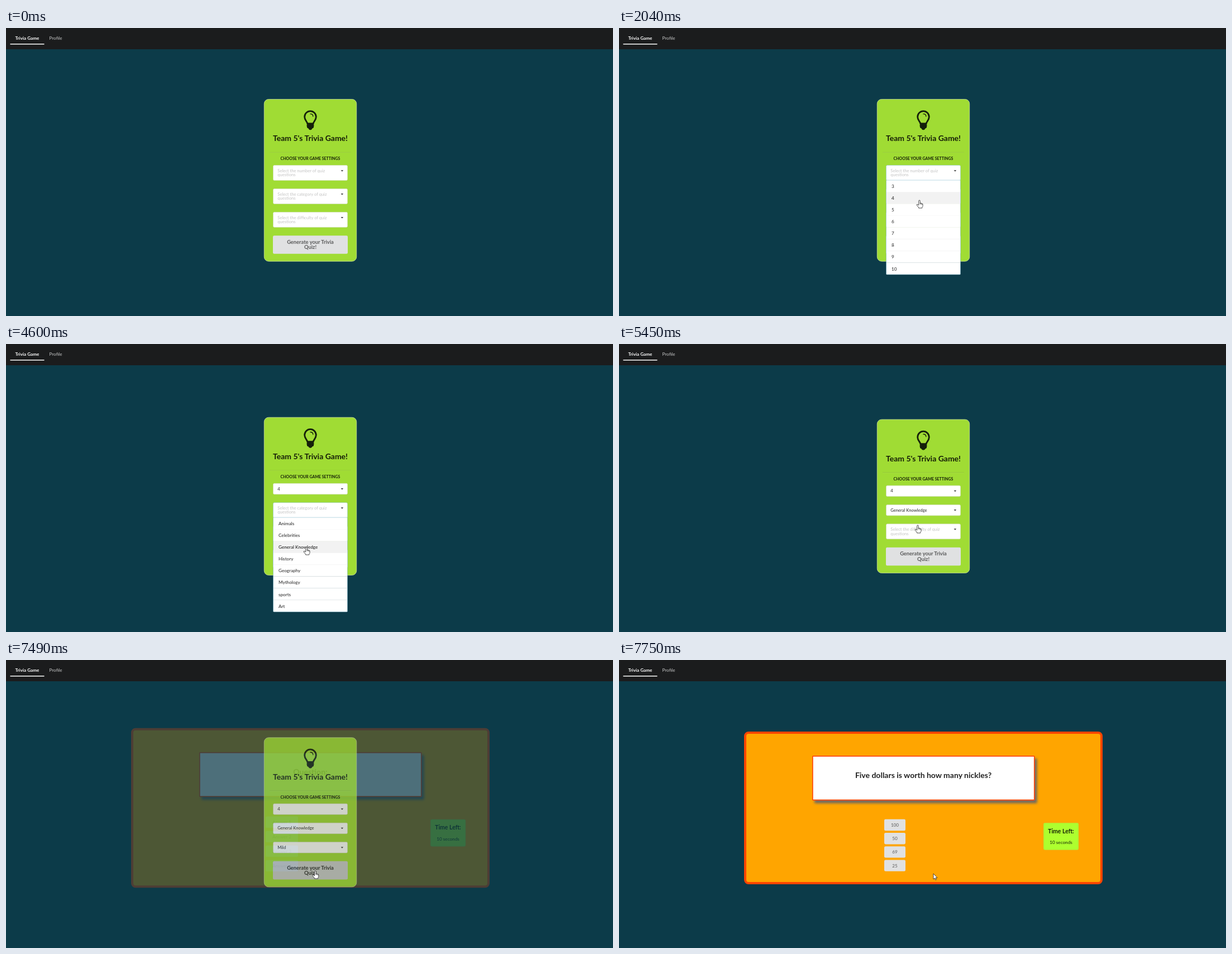
Write an HTML page that moves like this. It is 1087 px wide and 515 px high and loops after 8000 ms.

```html
<!DOCTYPE html>
<html lang="en">
<head>
<meta charset="utf-8">
<title>Trivia game</title>
<style>
  html, body { margin: 0; width: 100%; height: 100%; overflow: hidden; background: #0c3b49; }
  svg { display: block; width: 1087px; height: 515px; font-family: Lato, "Open Sans", sans-serif; }
</style>
</head>
<body>
<svg id="stage" viewBox="0 0 1087 515">
  <defs>
    <filter id="drop" x="-10%" y="-20%" width="120%" height="150%">
      <feDropShadow dx="4" dy="5" stdDeviation="2" flood-color="#666" flood-opacity=".95"/>
    </filter>
    <filter id="soft" x="-10%" y="-10%" width="120%" height="120%">
      <feDropShadow dx="0" dy="1" stdDeviation="1" flood-color="#222426" flood-opacity=".15"/>
    </filter>
  </defs>
  <rect width="1087" height="515" fill="#0c3b49"/>
  <g id="scene"></g>
  <rect width="1087" height="38" fill="#1b1c1d"/>
  <text x="16.5" y="20.8" font-size="8.17" font-weight="700" fill="#fff">Trivia Game</text>
  <text x="77.5" y="20.8" font-size="8.17" fill="#c8c9c9">Profile</text>
  <rect x="7.5" y="28" width="61" height="1.5" fill="#fff"/>
  <g id="pointer"></g>
</svg>
<script>
const LOOP = 8000, REM = 8.17, MID = 545, LEFT = 478.5, WIDTH = 133, ROW = 21.1;
const INK = 'rgba(0,0,0,.87)', GREEN = '#a0dc34';
const scene = document.getElementById('scene');
const pointer = document.getElementById('pointer');

const fields = [
  { name: 'number', open: 990, close: 2100, pick: 1,
    items: ['3', '4', '5', '6', '7', '8', '9', '10'] },
  { name: 'category', open: 3040, close: 4940, pick: 2,
    items: ['Animals', 'Celebrities', 'General Knowledge', 'History',
            'Geography', 'Mythology', 'sports', 'Art'] },
  { name: 'difficulty', open: 5790, close: 6525, pick: 0,
    items: ['Mild', 'Medium', 'SPICY!'] }
];

// Pointer tip: time, x, y
const path = [
  [130, 1029, 492], [920, 543, 262], [1190, 543, 262], [1650, 538, 308],
  [2300, 538, 308], [2700, 537, 298], [3500, 537, 298], [3820, 537, 318],
  [3880, 537, 318], [4600, 538, 363], [4980, 538, 363], [5450, 535, 324],
  [5980, 535, 324], [6400, 533, 355], [6630, 533, 355], [7020, 552, 376],
  [7420, 552, 376], [7700, 563, 382]
];

const clamp = v => Math.min(1, Math.max(0, v));
const progress = (t, from, to) => clamp((t - from) / (to - from));
const easeOut = (u, n) => 1 - (1 - u) ** n;
const smooth = u => u * u * (3 - 2 * u);

function tipAt(t) {
  let i = 0;
  while (i < path.length - 2 && t >= path[i + 1][0]) i++;
  const [a, b] = [path[i], path[i + 1]];
  const u = progress(t, a[0], b[0]);
  const e = i ? smooth(u) : easeOut(u, 2.3);
  return { x: a[1] + (b[1] - a[1]) * e, y: a[2] + (b[2] - a[2]) * e };
}

const rect = (x, y, w, h, fill, more = '') =>
  `<rect x="${x}" y="${y}" width="${w}" height="${h}" fill="${fill}" ${more}/>`;
const text = (s, x, y, size, fill = INK, more = '') =>
  `<text x="${x}" y="${y}" font-size="${size}" fill="${fill}" ${more}>${s}</text>`;
const centred = (s, x, y, size, fill, weight = 700) =>
  text(s, x, y, size, fill, `text-anchor="middle" font-weight="${weight}"`);
const group = (content, attrs) => `<g ${attrs}>${content}</g>`;

function layout(t) {
  const heights = fields.map(f => t < f.close ? 27 : 19.4);
  const height = 118.5 + heights.reduce((sum, h) => sum + h + 14.9, 0) + 46.3;
  const top = 272.3 - height / 2;
  let y = top + 118.5;
  const boxes = heights.map(h => {
    const box = { y, h };
    y += h + 14.9;
    return box;
  });
  return { top, height, boxes, button: y };
}

function menuScale(f, t) {
  if (t < f.close) return easeOut(progress(t, f.open, f.open + 200), 2);
  return 1 - easeOut(progress(t, f.close, f.close + 200), 2);
}

function bulb(top) {
  return group(`
    <path d="M540 24.5c-.4-4.2-5.3-6.3-5.3-12.5a10.3 10.5 0 0 1 20.6 0c0 6.2-4.9 8.3-5.3 12.5"
      fill="none" stroke="#15200a" stroke-width="2.8"/>
    <path d="M545 6.6c3 0 4.8 2 4.8 4.4" fill="none" stroke="#15200a" stroke-width="1.4" stroke-linecap="round"/>
    <path d="M539.5 22.5h11q1.8 1.8.5 3.6 1.3 1.6 0 3.2.6 2.5-2.4 3.2-1 2.7-3.6 2.7t-3.6-2.7q-3-.7-2.4-3.2-1.3-1.6 0-3.2-1.3-1.8.5-3.6z"
      fill="#15200a"/>`, `transform="translate(0 ${top + 20})"`);
}

function fieldBox(f, box, t) {
  const y = box.y, isOpen = menuScale(f, t) > 0;
  const border = isOpen ? '#96c8da' : '#d3dcc4';
  const out = rect(LEFT, y, WIDTH, box.h, '#fff', `rx="2" stroke="${border}" stroke-width=".6"`);
  const caret = `<path d="M599.7 ${y + 8.6}h4.4l-2.2 2.5z" fill="#333"/>`;
  const size = 7.58;
  if (t >= f.close) return out + caret + text(f.items[f.pick], 486.3, y + 12.2, size);
  return out + caret +
    text(`Select the ${f.name} of quiz`, 486.3, y + 12.2, size, '#c4c4c4') +
    text('questions', 486.3, y + 19.8, size, '#c4c4c4');
}

function menu(f, box, t, tip) {
  const s = menuScale(f, t);
  if (!s) return '';
  const top = box.y + box.h - .5, h = f.items.length * ROW;
  const hover = Math.floor((tip.y - top) / ROW);
  const rows = f.items.map((item, i) =>
    rect(LEFT + .3, i * ROW, WIDTH - .6, ROW, i === hover ? '#f2f2f2' : '#fff') +
    rect(LEFT + .3, i * ROW, WIDTH - .6, .5, '#f6f6f6') +
    text(item, 488, i * ROW + 13.8, REM, i === hover ? 'rgba(0,0,0,.95)' : INK)).join('');
  const frame = rect(LEFT, 0, WIDTH, h, 'none', 'rx="1.5" stroke="#96c8da" stroke-width=".6"');
  return group(group(rows, 'filter="url(#soft)"') + frame,
    `transform="translate(0 ${top}) scale(1 ${s})" opacity="${s}"`);
}

function card(t, tip, spot) {
  const { top, height, boxes, button } = spot;
  const hot = tip.y > button && t > 7000;
  const label = hot ? 'rgba(0,0,0,.8)' : 'rgba(0,0,0,.6)';
  return rect(462.3, top + .4, 165.4, height - .8, GREEN, 'rx="8" stroke="#c3dc92" stroke-width=".9"') +
    bulb(top) +
    centred("Team 5's Trivia Game!", MID, top + 75.4, 14) +
    rect(472, top + 94.8, 146, .6, 'rgba(34,36,38,.15)') +
    rect(472, top + 95.4, 146, .6, 'rgba(255,255,255,.1)') +
    centred('CHOOSE YOUR GAME SETTINGS', MID, top + 109.3, 7) +
    rect(LEFT - .5, button, WIDTH + 1, 32.6, hot ? '#cacbcd' : '#e0e1e2', 'rx="2.3"') +
    centred('Generate your Trivia', MID, button + 14.8, 9.33, label) +
    centred('Quiz!', MID, button + 24.1, 9.33, label) +
    fields.map((f, i) => fieldBox(f, boxes[i], t)).join('') +
    fields.map((f, i) => menu(f, boxes[i], t, tip)).join('');
}

function board(loaded) {
  const height = loaded ? 273 : 285.5, top = 264.5 - height / 2;
  const answers = loaded ? ['100', '50', '69', '25'] : [1, 2, 3, 4].map(n => `Answer ${n}`);
  const w = loaded ? 38 : 58, pitch = loaded ? 24.2 : 26;
  const first = loaded ? 284.8 : 279.7;
  const question = loaded ? 'Five dollars is worth how many nickles?' : 'Question:';
  return rect(226, top + 2, 638, height - 4, '#ffa500', 'rx="6" stroke="#ff4500" stroke-width="4"') +
    rect(346.8, top + 43.8, 397, 78.6, '#fff',
      'rx="1" stroke="#ff4500" stroke-width="1.7" filter="url(#drop)"') +
    centred(question, MID, top + 83, 14) +
    answers.map((a, i) =>
      rect(494 - w / 2, first + i * pitch, w, 20.4, '#e0e1e2', 'rx="2.3"') +
      centred(a, 494, first + i * pitch + 13.1, REM, 'rgba(0,0,0,.6)', 400)).join('') +
    rect(760.3, top + 163.4, 62.6, 48, '#adff2f', 'rx="2.3" stroke="#b9d83c" stroke-width=".6"') +
    centred('Time Left:', 791.5, top + 181.6, 10.49) +
    centred('10 seconds', 791.5, top + 201.2, REM, INK, 400);
}

function overControl(t, tip, spot) {
  if (t > 7620 || tip.x < LEFT || tip.x > LEFT + WIDTH) return false;
  const inside = (y, h) => tip.y >= y && tip.y <= y + h;
  return inside(spot.button, 32.6) || fields.some((f, i) => {
    const { y, h } = spot.boxes[i];
    return inside(y, h + (menuScale(f, t) > 0 ? f.items.length * ROW : 0));
  }) || t > 2100;
}

function cursor(tip, hand) {
  const shape = hand
    ? 'M-1.3 1.2Q-1.2 0 0 0T1.2 1.2V5.2Q2.4 4.5 3 5.6 4.2 5 4.7 6.2 6 5.8 6 7.5V10.3Q5.8 12 4.8 12.6V14H-1.4V12.9L-4.6 9Q-5.4 7.6-4.1 7.3-3.2 7.2-1.3 9Z'
    : 'M0 0V10L2.3 8 3.9 11.4 5.4 10.7 3.9 7.4H7Z';
  const knuckles = hand ? '<path d="M1.2 5V7.4M3.1 5.7V7.6M4.8 6.4V8" fill="none"/>' : '';
  return group(`<path d="${shape}" fill="#fff"/>${knuckles}`,
    `transform="translate(${tip.x} ${tip.y})" stroke="#222" stroke-width=".8" stroke-linejoin="round"`);
}

function render(t) {
  const tip = tipAt(t), spot = layout(t);
  const fade = progress(t, 7400, 7740);
  scene.innerHTML =
    (fade > 0 ? group(board(t >= 7650), `opacity="${fade}"`) : '') +
    (fade < 1 ? group(card(t, tip, spot), `opacity="${1 - fade}"`) : '');
  pointer.innerHTML = t < 130 ? '' : cursor(tip, overControl(t, tip, spot));
}

const start = performance.now();
function tick() {
  render((performance.now() - start) % LOOP);
  requestAnimationFrame(tick);
}
tick();
</script>
</body>
</html>
```
